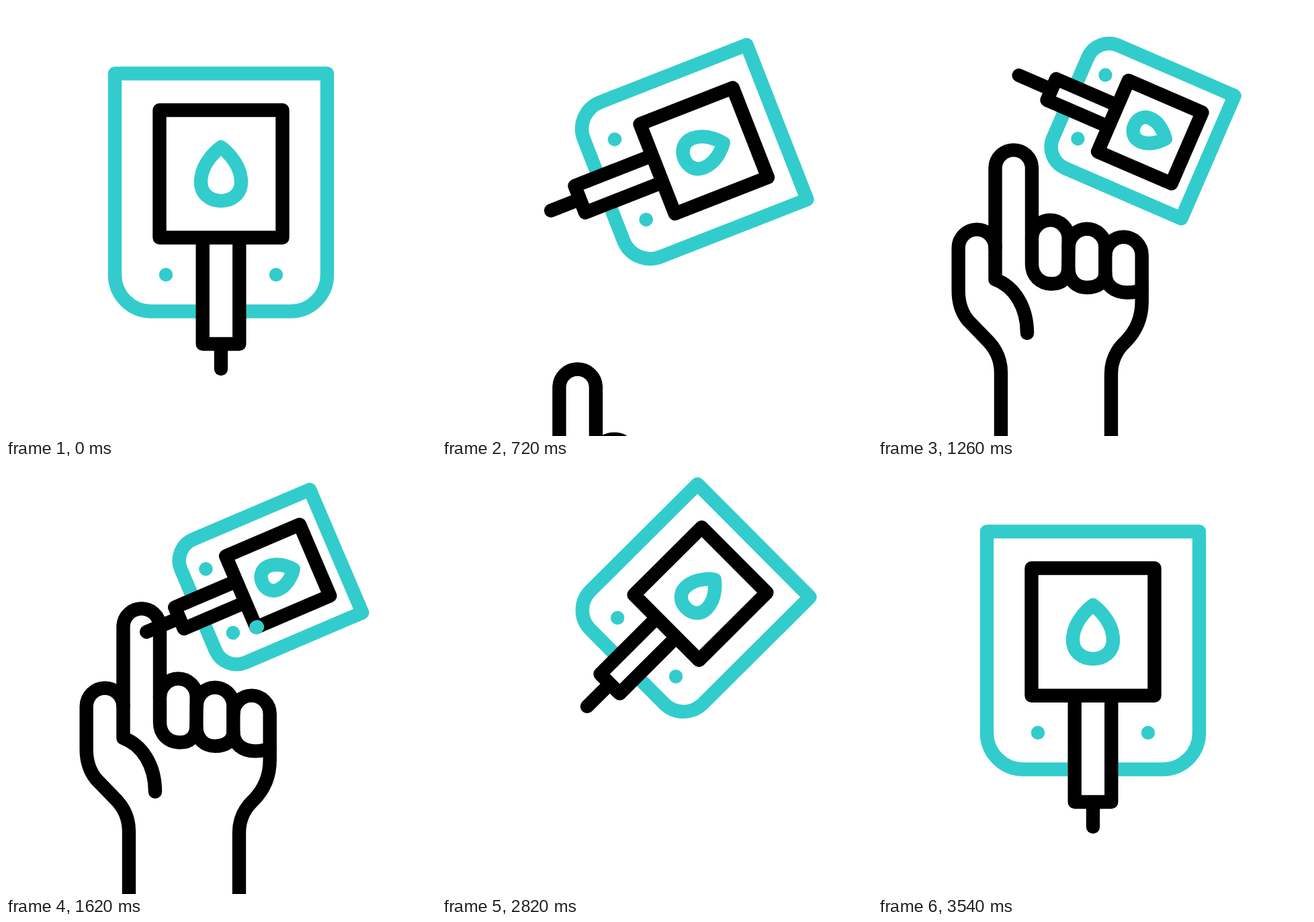
Write an HTML page that moves like this. It is 640 px wide and 640 px high and loops after 3.6 s.

```html
<!DOCTYPE html>
<html lang="en">
<head>
<meta charset="utf-8">
<title>Finger prick test</title>
<style>
  html, body { margin: 0; width: 100%; height: 100%; overflow: hidden; background: #fff; }
  svg { display: block; width: 640px; height: 640px; }
  .teal { stroke: #33cccc; }
  .paper { fill: #fff; }
</style>
</head>
<body>
<svg viewBox="0 0 640 640" fill="none" stroke="#000" stroke-width="20.4" stroke-linecap="round" stroke-linejoin="round">
  <g id="hand">
    <path d="M174.5 360A27.4 27.4 0 0 0 119.7 360V424C119.7 442 125 457 134 468L165 500C177 513 183 528 183 546V720"/>
    <path d="M222 487C222 447 202 417 174.5 407V240A27.3 27.3 0 0 1 229 240V384C229 402 242 413.5 259 413.5C273 413.5 283 406 283.3 390"/>
    <path d="M229 346A27.3 27.3 0 0 1 283.7 346L283.3 390C283.3 409 296 419 311 419C327 419 338.3 411 338.3 398"/>
    <path d="M283.7 359A27.3 27.3 0 0 1 338.3 359V398C338.3 416 352 426.5 371 426.5C380 426.5 388 425 392.7 421"/>
    <path d="M338.3 371A27.2 27.2 0 0 1 392.7 371V440C392.7 465 383 485 368 500C354 513 347 528 347 548V720"/>
  </g>
  <g id="meter">
    <path class="teal" d="M162 100.5H478V400A54 54.5 0 0 1 424 454.5H216A54 54.5 0 0 1 162 400Z"/>
    <path class="teal" d="M238 400h0M402 400h0"/>
    <path id="needle"/>
    <path class="paper" d="M292.7 344.7V503H347.3V344.7"/>
    <path class="paper" d="M228.5 155H411.5V344.7H228.5Z"/>
    <path id="fill" class="teal" d="M411.5 344.7V155H228.5V344.7H411.5"/>
    <path class="teal" d="M320 210C320 210 290 231 290 262C290 280 304 290 320 290C336 290 350 280 350 262C350 231 320 210 320 210Z"/>
  </g>
</svg>
<script>
const LOOP = 3600, WIDTH = 20.4, PERIMETER = 745.4;
const PIVOT = [311, 300];
const $ = id => document.getElementById(id);
const hand = $('hand'), meter = $('meter'), needle = $('needle'), fill = $('fill');

// Eased value along keys of [time, value]
function track(keys, t) {
  if (t <= keys[0][0]) return keys[0][1];
  for (let i = 1; i < keys.length; i++) {
    const [t0, a] = keys[i - 1], [t1, b] = keys[i];
    if (t < t1) {
      const x = (t - t0) / (t1 - t0);
      return a + (b - a) * x * x * (3 - 2 * x);
    }
  }
  return keys[keys.length - 1][1];
}

const START = 112, RAISED = 1200, PRICKED = 1600, LEAVE = 2390, END = 3520;
const move = (rest, raised, pricked) =>
  [[START, rest], [RAISED, raised], [PRICKED, pricked], [LEAVE, pricked], [END, rest]];

const keys = {
  angle: move(0, 116.5, 66.9),
  scale: move(1, 0.63, 0.63),
  x: move(PIVOT[0], 378.3, 373.4),
  y: move(PIVOT[1], 169.6, 173.8),
  needle: move(37, 53, 53),
  fill: [[PRICKED, 0], [2200, 1], [2800, 0]],
  hand: [[430, 480], [RAISED, 0], [2400, 3], [2870, 480]]
};

function draw(t) {
  const v = {};
  for (const k in keys) v[k] = track(keys[k], t);

  hand.setAttribute('transform', `translate(0 ${v.hand})`);
  meter.setAttribute('transform',
    `translate(${v.x} ${v.y}) rotate(${v.angle}) scale(${v.scale}) translate(${-PIVOT[0]} ${-PIVOT[1]})`);
  // Line weight stays constant while the device shrinks
  meter.setAttribute('stroke-width', WIDTH / v.scale);
  needle.setAttribute('d', `M320 503v${v.needle / v.scale}`);
  fill.setAttribute('visibility', v.fill > 0 ? 'visible' : 'hidden');
  fill.setAttribute('stroke-dasharray', `${v.fill * PERIMETER} 2000`);
}

const begin = performance.now();
function tick() {
  draw((performance.now() - begin) % LOOP);
  requestAnimationFrame(tick);
}
draw(0);
requestAnimationFrame(tick);
</script>
</body>
</html>
```
